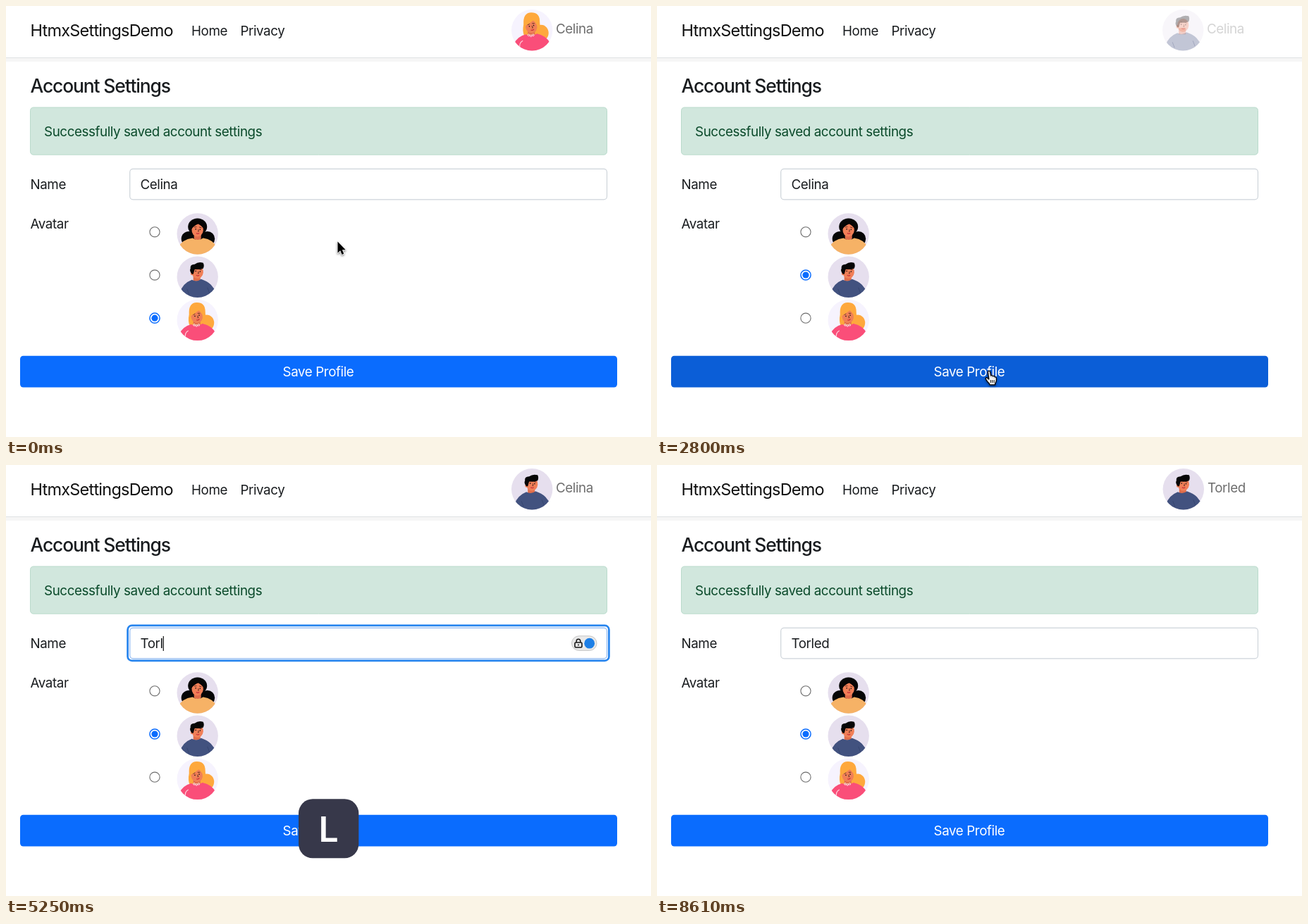
An HTML page with a canvas for the animation above (8680 ms loop, 915x612 px).

```html
<!DOCTYPE html>
<html lang="en">
<head>
<meta charset="utf-8">
<title>Account Settings</title>
<style>
  html, body { margin: 0; width: 100%; height: 100%; overflow: hidden; background: #fff; }
  canvas { display: block; }
</style>
</head>
<body>
<canvas id="stage" width="915" height="612"></canvas>
<script>
const ctx = document.getElementById('stage').getContext('2d');
const LOOP = 8680, STEP = 70;
const FONT = 'Inter, "Liberation Sans", sans-serif';
const BLUE = [10, 108, 254], HOVER = [11, 94, 215], ACTIVE = [6, 90, 214];
const SKIN = '#f07f57', NECK = '#df6d4b', HAIR = '#060606', GOLD = '#fea83d';
const OLD_NAME = 'Celina', NEW_NAME = 'Torled';
const KEY_TIMES = [4410, 4690, 4830, 5180, 5390, 5600];
const FOCUS = 4060, SELECT = 4130, KEYS_END = 6790;
const PRESS_1 = 2420, SWAP_1 = 2520, PRESS_2 = 6790, SWAP_2 = 6900, FADE = 950;

// time, x, y
const PATH = [
  [630, 470.5, 334.5], [1190, 210, 380], [1820, 210, 380], [2240, 471.5, 518.5],
  [3140, 471.5, 518.5], [3430, 248, 334.5], [3920, 222, 254], [6020, 222, 254],
  [6580, 346, 519.5], [6860, 346, 519.5], [7000, 345, 518.5], [7910, 345, 518.5], [8470, 338, 640]
];

const clamp = v => Math.max(0, Math.min(1, v));
const ramp = (t, from, ms) => clamp((t - from) / ms);
const smooth = v => v * v * (3 - 2 * v);
const mix = (a, b, k) => a.map((v, i) => v + (b[i] - v) * k);
const rgb = c => `rgb(${c.map(Math.round).join()})`;

function text(str, x, y, { size = 18.8, color = '#191c1f', align = 'left', weight = 400, track = -0.022 } = {}) {
  ctx.font = `${weight} ${size}px ${FONT}`;
  ctx.letterSpacing = `${size * track}px`;
  ctx.textAlign = align;
  ctx.fillStyle = color;
  ctx.fillText(str, x, y);
  return ctx.measureText(str).width;
}

function paint(fill, stroke, lw = 1) {
  if (fill) { ctx.fillStyle = fill; ctx.fill(); }
  if (stroke) { ctx.strokeStyle = stroke; ctx.lineWidth = lw; ctx.stroke(); }
}

function box(x, y, w, h, r, fill, stroke, lw) {
  ctx.beginPath();
  ctx.roundRect(x, y, w, h, r);
  paint(fill, stroke, lw);
}

function oval(x, y, rx, ry, fill) {
  ctx.beginPath();
  ctx.ellipse(x, y, rx, ry, 0, 0, 7);
  paint(fill);
}

function shape(d, fill, stroke, lw = 1) {
  const p = new Path2D(d);
  if (fill) { ctx.fillStyle = fill; ctx.fill(p); }
  if (stroke) { ctx.strokeStyle = stroke; ctx.lineWidth = lw; ctx.stroke(p); }
}

function face(x, y, tilt) {
  ctx.save();
  ctx.translate(x, y);
  ctx.rotate(tilt);
  oval(0, 0, 8.2, 9.4, SKIN);
  oval(-2.6, -1, .8, .9, '#1b1516');
  oval(3.6, -1, .8, .9, '#1b1516');
  shape('M-5 -3.6l3.4 -.6M2 -4.2l3.4 .6M1 -1l.8 3H.4', null, '#4a211b', .8);
  shape('M-1.5 4.6q2.4 1.6 4.4 -.4', null, '#c8303a', 1.2);
  ctx.restore();
}

const avatars = {
  dark() {
    oval(-12, 7, 11, 10.5, HAIR);
    oval(14, 7, 10.5, 10.5, HAIR);
    oval(0, -10, 13.5, 12, HAIR);
    shape('M-5 -2H5V7Q0 11 -5 7Z', NECK);
    face(0, -5.5, .08);
    shape('M-10 -5Q-11 -17 0 -17Q11 -17 10 -5Q7 -11 1 -14Q-5 -12 -10 -5', HAIR);
    shape('M-27 19Q-22 8 -7 6Q0 11 8 6Q22 8 27 19V31H-27Z', '#f6b266');
  },
  short() {
    shape('M-6 -3H4V6H-6Z', NECK);
    face(0, -7, .1);
    oval(-8, -5, 1.8, 2.5, SKIN);
    shape('M-8 -4Q-12 -9 -10 -12Q-11 -18 -4 -18Q1 -22 8 -20Q10 -16 8 -12Q3 -10 -4 -11L-6 -4Z', HAIR);
    shape('M-25 22Q-21 9 -8 4Q-1 8 5 3Q14 6 19 11L26 20V31H-25Z', '#42527f');
    shape('M-15 17l3 8M14 15l3 8', null, '#34436c', .8);
  },
  fair() {
    oval(13, 4, 10.5, 11.5, GOLD);
    shape('M-11 8Q-14 2 -12 -8Q-13 -25 -1 -25Q11 -25 11 -12Q11 -4 15 2L6 12Z', GOLD);
    shape('M-6 -2H4V7Q-1 11 -6 7Z', NECK);
    face(-1, -5, -.2);
    shape('M-11 -5Q-12 -18 0 -18Q8 -18 9 -6Q5 -10 2 -14Q-4 -9 -11 -5', GOLD);
    shape('M-26 20Q-21 9 -9 6Q-1 10 7 5Q21 8 26 19V31H-26Z', '#fa4e79');
    for (let i = -1; i < 2; i++) {
      ctx.beginPath();
      ctx.arc(-1.5 + i * 3.2, 8 - Math.abs(i), 1.3, 0, 7);
      paint(null, '#fff', .8);
    }
    shape('M-13 15Q-19 18 -17 26', null, '#ffd4df', 1.1);
  }
};

function avatar(kind, x, y) {
  ctx.save();
  ctx.translate(x, y);
  ctx.beginPath();
  ctx.arc(0, 0, 29.2, 0, 7);
  ctx.clip();
  ctx.fillStyle = kind === 'fair' ? '#f6f3fe' : '#e6dfee';
  ctx.fillRect(-30, -30, 60, 60);
  avatars[kind]();
  ctx.restore();
}

function radio(y, on) {
  ctx.beginPath();
  ctx.arc(211, y, 7.1, 0, 7);
  paint('#fff', on ? rgb(BLUE) : '#6c6c6c', on ? 1.5 : 1.1);
  if (on) oval(211, y, 4.6, 4.6, rgb(BLUE));
}

function header(t) {
  text('HtmxSettingsDemo', 34.5, 43, { size: 23.5, track: -0.033, color: '#111' });
  text('Home', 263, 41.5);
  text('Privacy', 332.5, 41.5);
  ctx.fillStyle = '#f6f6f6';
  ctx.fillRect(0, 74, 915, 5);
  ctx.fillStyle = '#dfe1e3';
  ctx.fillRect(0, 73, 915, 1);

  const second = t >= SWAP_2;
  ctx.globalAlpha = t < SWAP_1 ? 1 : ramp(t, second ? SWAP_2 : SWAP_1, FADE);
  avatar(t < SWAP_1 ? 'fair' : 'short', second ? 746.8 : 746.2, 34.3);
  text(second ? NEW_NAME : OLD_NAME, second ? 781 : 780, 39, { color: '#6e6e6e' });
  ctx.globalAlpha = 1;
}

function nameField(t) {
  const typed = KEY_TIMES.filter(k => t >= k).length;
  const value = typed ? NEW_NAME.slice(0, typed) : OLD_NAME;
  const focused = t >= FOCUS && t < PRESS_2;
  const ring = t < SWAP_2 ? ramp(t, FOCUS - STEP, 140) * (1 - .15 * ramp(t, PRESS_2, 70)) : 0;
  if (ring) {
    box(172.6, 227.9, 682.8, 50, 6, null, `rgba(38,132,238,${ring})`, 2.7);
  }
  box(175.7, 231.4, 676.8, 43.4, 4.5, '#fff', ring ? '#8fb9f2' : '#ced4da', 1.2);
  if (t >= SELECT && !typed) {
    ctx.fillStyle = '#b3d7ff';
    ctx.fillRect(190, 242, 54, 23);
  }
  const w = text(value, 190.5, 260);
  if (!focused) return;
  const last = KEY_TIMES[typed - 1];
  if (typed && (t - last) % 1060 < 530) {
    ctx.fillStyle = '#111';
    ctx.fillRect(190.5 + w, 243, 1.2, 21);
  }
  box(802.5, 242.8, 35.5, 20.6, 10.3, '#e9e9e9', '#c6c6c6');
  box(807, 252, 10, 7, 1.5, null, '#161616', 1.6);
  shape('M809.2 252V250a2.8 2.8 0 0 1 5.6 0V252M812 254.5v2', null, '#161616', 1.5);
  oval(827.7, 253.2, 7.4, 7.4, '#1d7fe6');
}

function button(t) {
  const hover = ramp(t, 2150, 150) - ramp(t, 3200, 150) + ramp(t, 6440, 150) - ramp(t, 7980, 150);
  const press = ramp(t, PRESS_1 - 40, 70) - ramp(t, SWAP_1, 70) + ramp(t, PRESS_2 - 20, 70) - ramp(t, SWAP_2, 70);
  if (t >= PRESS_1 && t < SWAP_1) box(18.6, 495.6, 849.8, 47.2, 5.5, '#b4cff5');
  box(20, 496.8, 847, 44.7, 4.5, rgb(mix(mix(BLUE, HOVER, hover), ACTIVE, press)));
  text('Save Profile', 443, 526, { color: '#fff', align: 'center' });
}

function keycap(t) {
  const typed = KEY_TIMES.filter(k => t >= k).length;
  const alpha = 1 - ramp(t, KEYS_END, 100);
  if (!typed || !alpha) return;
  const key = NEW_NAME[typed - 1].toUpperCase();
  ctx.globalAlpha = alpha;
  ctx.font = `600 50px ${FONT}`;
  ctx.letterSpacing = '0px';
  const w = ctx.measureText(key).width + 57;
  box(457.7 - w / 2, 474.3, w, 84, 20, '#37384a');
  text(key, 457.7, 535, { size: 50, weight: 600, track: 0, color: '#fff', align: 'center' });
  ctx.globalAlpha = 1;
}

function pointer(t) {
  if (t >= KEY_TIMES[0] && t < 6020) return;
  let i = PATH.findIndex(p => p[0] > t);
  if (i < 0) i = PATH.length - 1;
  const b = PATH[i], a = PATH[Math.max(0, i - 1)];
  const [, x, y] = mix(a, b, a === b ? 0 : smooth(ramp(t, a[0], b[0] - a[0])));
  const inside = (l, top, r, bottom) => x > l && x < r && y > top && y < bottom;
  ctx.save();
  ctx.translate(x, y);
  ctx.lineJoin = 'round';
  if (inside(175, 231, 853, 275)) {
    const beam = 'M-3 -9Q0 -9 0 -6V6Q0 9 -3 9M3 -9Q0 -9 0 -6M0 6Q0 9 3 9M-2 3H2';
    shape(beam, null, '#fff', 3);
    shape(beam, null, '#111', 1.2);
  } else {
    ctx.shadowColor = 'rgba(0,0,0,.35)';
    ctx.shadowBlur = 3;
    ctx.shadowOffsetY = 1.5;
    if (inside(20, 497, 867, 541)) {
      shape('M-2.2 1Q-.6 -1.8 1.2 .8L2.2 6.4Q4 5.2 5 7.2Q7 6 7.8 8.4Q10 7.8 10 10.5V13Q9.6 15.6 8.2 17.5V19.4H.4L-.2 17.4Q-3.2 15 -5 11.5Q-5.8 8.6 -3.2 9.3L-.7 11.4Z', '#fff', '#000', 1.3);
      ctx.shadowColor = 'transparent';
      shape('M1.8 12.5V16.5M4.2 12.5V16.5M6.6 12.5V16.5', null, '#000', 1);
    } else {
      const arrow = 'M0 0V16.2L3.7 12.8L6.1 18.4L8.8 17.2L6.4 11.8H11.3Z';
      shape(arrow, '#000', '#fff', 1.8);
      ctx.shadowColor = 'transparent';
      shape(arrow, '#000');
    }
  }
  ctx.restore();
}

function draw(t) {
  ctx.fillStyle = '#fff';
  ctx.fillRect(0, 0, 915, 612);
  header(t);
  text('Account Settings', 34.5, 123, { size: 26.4, track: -0.042, weight: 450 });
  box(34.5, 144, 818, 67.2, 4.5, '#d1e7dd', '#badbcc');
  text('Successfully saved account settings', 54, 185, { color: '#0a4a2a' });
  text('Name', 34.5, 260);
  nameField(t);
  text('Avatar', 34.5, 316);
  const chosen = t < 1610 ? 2 : 1;
  ['dark', 'short', 'fair'].forEach((kind, i) => {
    radio(320.8 + i * 61.2, i === chosen);
    avatar(kind, 271.7, 323.5 + i * 61.2);
  });
  button(t);
  keycap(t);
  pointer(t);
}

const start = performance.now();
function tick() {
  const t = (performance.now() - start) % LOOP;
  draw(Math.floor(t / STEP) * STEP);
  requestAnimationFrame(tick);
}
tick();
</script>
</body>
</html>
```
